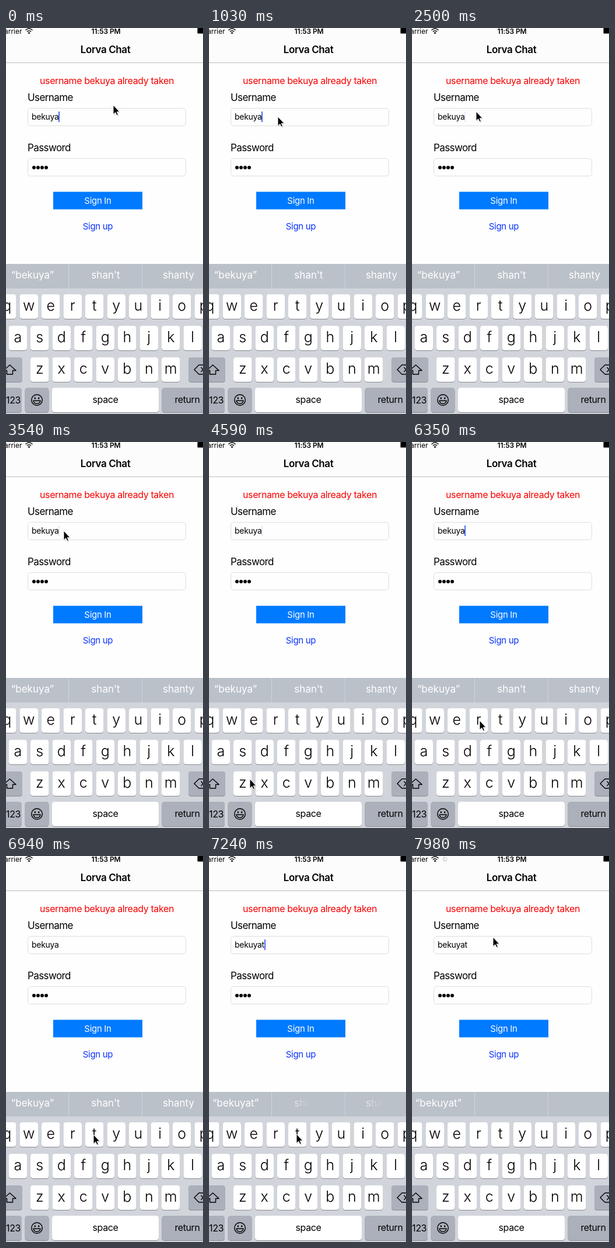
Animation, 338 px wide and 661 px high, one loop 8 s. Source, as an HTML page:

```html
<!DOCTYPE html>
<html lang="en">
<head>
<meta charset="utf-8">
<title>Sign in</title>
<style>
  html, body { margin: 0; width: 100%; height: 100%; overflow: hidden; background: #fefefe; }
  svg { display: block; width: 100vw; height: 100vh; font-family: Inter, Roboto, sans-serif; }
  .mid { text-anchor: middle; }
  .end { text-anchor: end; }
  .label { font-size: 17px; letter-spacing: -.6px; }
  .error { font-size: 16px; letter-spacing: -.4px; fill: #f80000; }
  .small { font-size: 15px; letter-spacing: -.3px; }
  .entry { font-size: 14px; letter-spacing: -.3px; }
  .hint { font-size: 17px; fill: #fff; }
  .letter { font-size: 25px; font-weight: 300; }
  .word { font-size: 16px; letter-spacing: -.4px; }
  .field { fill: #fefefe; stroke: #dedede; }
  .line { fill: none; stroke: #000; stroke-width: 1.4; }
</style>
</head>
<body>
<svg viewBox="0 0 338 661" preserveAspectRatio="none">
  <defs>
    <linearGradient id="wipe">
      <stop offset="0" stop-color="#fff" stop-opacity=".6"/>
      <stop offset=".55" stop-color="#fff" stop-opacity="0"/>
    </linearGradient>
  </defs>

  <rect width="338" height="661" fill="#fefefe"/>
  <rect width="338" height="59" fill="#fcfcfc"/>
  <rect y="59" width="338" height="1" fill="#bcbcbc"/>

  <g id="status">
    <text class="end" x="27.5" y="9.5" font-size="12">Carrier</text>
    <g class="line" stroke-width="1.8">
      <path d="M33.5 3.8Q39.5 -1.6 45.5 3.8M35.8 6.3Q39.5 3 43.2 6.3"/>
      <path d="M39.5 10.3L37.4 8.2Q39.5 6.4 41.6 8.2Z" fill="#000" stroke="none"/>
    </g>
    <g id="spinner" stroke="#999" stroke-width="1.1" stroke-linecap="round"></g>
    <text class="mid" x="171.5" y="9.5" font-size="12" font-weight="600" letter-spacing="-.1">11:53 PM</text>
    <rect x="328.5" y="0" width="12" height="9.5" rx="1"/>
  </g>

  <text class="mid" x="170.5" y="43" font-size="17" font-weight="600" letter-spacing="-.4">Lorva Chat</text>
  <text class="mid error" x="173" y="96">username bekuya already taken</text>

  <text class="label" x="37" y="125">Username</text>
  <rect class="field" x="37.5" y="137.5" width="271" height="30" rx="5"/>
  <text class="entry" id="entry" x="44" y="157"></text>
  <rect id="caret" y="143" width="2" height="18" fill="#4a6cf0"/>

  <text class="label" x="37" y="210.5">Password</text>
  <rect class="field" x="37.5" y="223.5" width="271" height="30" rx="5"/>
  <path d="M48 239h21.1" stroke="#000" stroke-width="6" stroke-linecap="round" stroke-dasharray="0 7"/>

  <rect x="81" y="280.5" width="153" height="30" fill="#007aff"/>
  <text class="mid small" x="157.5" y="301" fill="#fff">Sign In</text>
  <text class="mid small" x="157.5" y="345" fill="#0a32ff">Sign up</text>

  <rect y="404" width="338" height="257" fill="#d1d5db"/>
  <rect y="404" width="338" height="42" fill="#bbc1c9"/>
  <path d="M107.5 404v42M233.5 404v42" stroke="#cfd4da"/>
  <text class="mid hint" id="typed" x="45.5" y="429"></text>
  <g id="hints">
    <text class="mid hint" x="171" y="429">shan't</text>
    <text class="mid hint" x="296" y="429">shanty</text>
  </g>

  <g id="keys"></g>
  <path class="line" d="M6.5 577L17 586.5H11.5V593H1.5V586.5H-4Z" stroke-linejoin="round"/>
  <path class="line" d="M345 577H331L323 585L331 593H345M334.5 581l7 8M334.5 589l7-8" stroke-linejoin="round"/>
  <g transform="translate(53 637)">
    <circle class="line" r="9.3"/>
    <ellipse cx="-3.2" cy="-3" rx="1.2" ry="1.8"/>
    <ellipse cx="3.2" cy="-3" rx="1.2" ry="1.8"/>
    <path class="line" d="M-6 1.3H6Q4.8 6.3 0 6.3T-6 1.3Z"/>
  </g>

  <g id="pointer">
    <path d="M1 1.5V17.5L4.7 14L7 19L9.4 18L7.2 13H12Z" fill="#000" opacity=".18"/>
    <path d="M0 0V16L3.7 12.6L6 17.6L8.4 16.6L6.2 11.7H11Z" stroke="#fff" stroke-width="1"/>
  </g>
</svg>

<script>
  const LOOP = 8000, STEP = 147.7, LEAD = 11;
  const TYPED_AT = 48;
  const $ = id => document.getElementById(id);

  // Pointer tip: [step, x, y]
  const path = [
    [0, 184, 132], [2, 172, 111], [5, 130, 157], [8, 112, 149], [16, 112, 149],
    [17, 110, 143], [18, 105, 148], [20, 103, 150], [24, 99, 152],
    [25, 148, 260], [26, 163, 400], [27, 143, 503], [28, 122, 540],
    [31, 70, 577], [33, 20, 608], [35, 82, 486], [38, 105, 480], [43, 116, 477],
    [44, 116, 477], [47, 150, 477], [51, 150, 475],
    [52, 176, 380], [53, 166, 240], [54, 139, 139]
  ];

  function pointerAt(step) {
    const i = path.findIndex(p => p[0] >= step);
    if (i < 0) return path.at(-1).slice(1);
    const b = path[i], a = path[i - 1] || b;
    const k = a === b ? 0 : (step - a[0]) / (b[0] - a[0]);
    return [a[1] + (b[1] - a[1]) * k, a[2] + (b[2] - a[2]) * k];
  }

  function caretAt(step) {
    if (step >= TYPED_AT) return step < 52 ? 1 : 0;
    const phase = (step * STEP + 560) % 1020;
    if (phase < 50) return .15;
    if (phase < 430) return 0;
    return phase < 560 ? .5 : 1;
  }

  function key(x, y, width, label, style, fill = "#fff") {
    const rect = dy => `<rect x="${x}" y="${y + dy}" width="${width}" height="42" rx="4.5"`;
    const baseline = y + (style === "letter" ? 27.5 : 25.5);
    return `${rect(1)} fill="#888b90"/>${rect(0)} fill="${fill}"/>` +
      `<text class="mid ${style}" x="${x + width / 2}" y="${baseline}">${label}</text>`;
  }

  const row = (letters, x, y) =>
    [...letters].map((c, i) => key(x + i * 37.5, y, 31.5, c, "letter")).join("");

  const GREY = "#abb0ba";
  $("keys").innerHTML =
    row("qwertyuiop", -14, 456) + row("asdfghjkl", 4.5, 510) + row("zxcvbnm", 42, 564) +
    key(-14, 564, 42, "", "word", GREY) + key(313, 564, 42, "", "word", GREY) +
    key(-14, 616, 41, "", "word", GREY) + key(32.5, 616, 41, "", "word", GREY) +
    key(79, 616, 183, "space", "word") + key(267.5, 616, 87, "return", "word", GREY) +
    `<text class="end word" x="25" y="642.5">123</text>`;

  $("spinner").innerHTML = Array.from({ length: 8 }, (_, i) =>
    `<path d="M57 2.8V1" opacity="${.3 + i * .09}" transform="rotate(${i * 45} 57 5)"/>`).join("");

  function draw(now) {
    const step = Math.floor((now % LOOP + LEAD) / STEP);
    const typed = step >= TYPED_AT;
    const name = typed ? "bekuyat" : "bekuya";
    $("entry").textContent = name;
    $("typed").textContent = `“${step > TYPED_AT ? name : "bekuya"}”`;
    $("caret").setAttribute("x", typed ? 95 : 90);
    $("caret").setAttribute("opacity", caretAt(step));
    $("pointer").setAttribute("transform", `translate(${pointerAt(step)})`);
    $("spinner").style.display = step >= 53 || step === 21 || step === 22 ? "" : "none";
    $("hints").style.display = step > TYPED_AT + 1 ? "none" : "";
    for (const hint of $("hints").children)
      hint.style.fill = step === TYPED_AT + 1 ? "url(#wipe)" : "";
  }

  const start = performance.now();
  function tick() {
    draw(performance.now() - start);
    requestAnimationFrame(tick);
  }
  tick();
</script>
</body>
</html>
```
